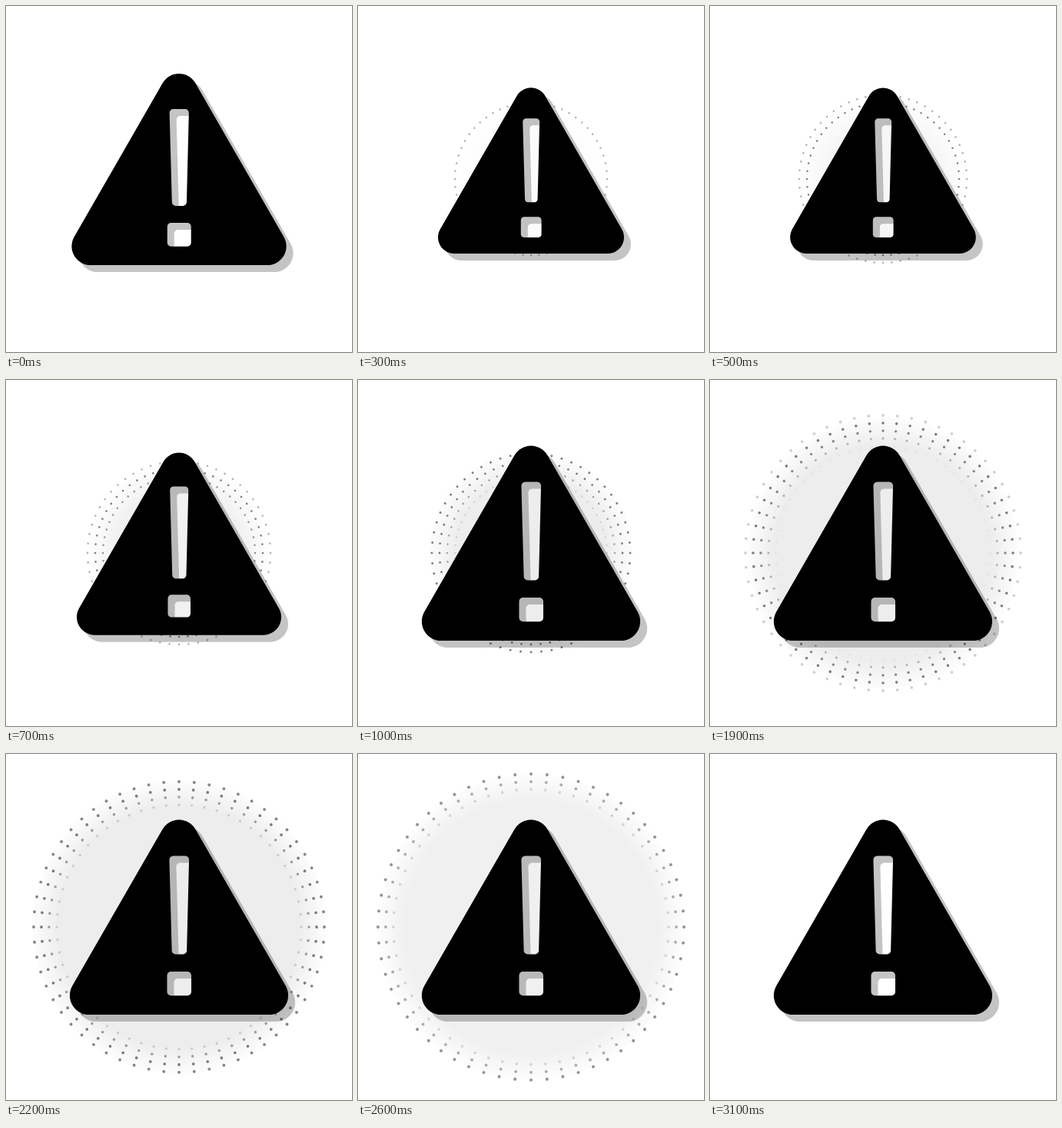
Recreate the animation shown at these times as an HTML page with a canvas. Size 450 px wide and 450 px high, loop 3.6 s.

```html
<!DOCTYPE html>
<html lang="en">
<head>
<meta charset="utf-8">
<title>Warning sign</title>
<style>
  html, body { margin: 0; width: 100%; height: 100%; overflow: hidden; background: #fff; }
  canvas { display: block; width: 100vmin; height: 100vmin; }
</style>
</head>
<body>
<canvas id="stage"></canvas>
<script>
const SIZE = 450, MID = SIZE / 2, LOOP = 3600, STEP = 100, REST = 3100;
const RINGS = 11, DOTS = 60, FIRST_RADIUS = 99, RING_GAP = 10;
const FIRST_START = 170, RING_DELAY = 205;

const canvas = document.getElementById('stage');
const ctx = canvas.getContext('2d');
const ratio = window.devicePixelRatio || 1;
canvas.width = canvas.height = SIZE * ratio;

const ramp = (t, from, to) => Math.min(1, Math.max(0, (t - from) / (to - from)));
const ease = p => p * p * (3 - 2 * p);
const fadeOut = t => 1 - ramp(t, 2500, REST);

function signScale(t) {
  const dip = ease(ramp(t, -100, 400)) - ease(ramp(t, 400, 920));
  return 1 - .166 * dip;
}

function addRoundedPolygon(path, points, radius) {
  const [ax, ay] = points[0], [zx, zy] = points[points.length - 1];
  path.moveTo((ax + zx) / 2, (ay + zy) / 2);
  points.forEach(([x, y], i) => {
    const [nx, ny] = points[(i + 1) % points.length];
    path.arcTo(x, y, nx, ny, radius);
  });
  path.closePath();
}

const sign = new Path2D();
addRoundedPolygon(sign, [[MID, 60.5], [MID + 160.3, 339], [MID - 160.3, 339]], 25);
addRoundedPolygon(sign, [[212.3, 132.5], [238.2, 132.5], [235, 260.5], [215.8, 260.5]], 5);
addRoundedPolygon(sign, [[209.5, 283], [241, 283], [241, 314.3], [209.5, 314.3]], 5);

// Soft disc that grows along with the newest ring.
function drawHalo(t) {
  const grown = (t - FIRST_START) / RING_DELAY * RING_GAP;
  const radius = Math.min(FIRST_RADIUS - 7 + grown, 199);
  const alpha = .072 * ramp(t, 150, 850) * fadeOut(t);
  const fill = ctx.createRadialGradient(MID, MID, radius - 34, MID, MID, radius);
  fill.addColorStop(0, `rgba(0,0,0,${alpha})`);
  fill.addColorStop(1, `rgba(0,0,0,${alpha * .1})`);
  ctx.fillStyle = fill;
  ctx.beginPath();
  ctx.arc(MID, MID, radius, 0, 2 * Math.PI);
  ctx.fill();
}

function drawRing(i, t) {
  const age = t - FIRST_START - RING_DELAY * i;
  const alpha = ease(ramp(age, 0, 220)) * (1 - ramp(age, 450, 950)) * fadeOut(t);
  const radius = FIRST_RADIUS + RING_GAP * i, dot = 1.25 + .08 * i;
  ctx.fillStyle = `rgba(0,0,0,${.5 * alpha})`;
  ctx.beginPath();
  for (let k = 0; k < DOTS; k++) {
    const angle = 2 * Math.PI * k / DOTS;
    const x = MID + radius * Math.sin(angle), y = MID - radius * Math.cos(angle);
    ctx.moveTo(x + dot, y);
    ctx.arc(x, y, dot, 0, 2 * Math.PI);
  }
  ctx.fill();
}

function drawSign(scale, offset, color) {
  ctx.save();
  ctx.translate(MID + offset, MID + offset);
  ctx.scale(scale, scale);
  ctx.translate(-MID, -MID);
  ctx.fillStyle = color;
  ctx.fill(sign, 'evenodd');
  ctx.restore();
}

function draw(t) {
  ctx.setTransform(ratio, 0, 0, ratio, 0, 0);
  ctx.fillStyle = '#fff';
  ctx.fillRect(0, 0, SIZE, SIZE);
  drawHalo(t);
  for (let i = 0; i < RINGS; i++) drawRing(i, t);
  const scale = signScale(t);
  drawSign(scale, 9, 'rgba(0,0,0,.23)');
  drawSign(scale, 0, '#000');
}

const begin = performance.now();
function tick() {
  const t = (performance.now() - begin) % LOOP;
  draw(Math.min(REST, Math.floor(t / STEP) * STEP));
  requestAnimationFrame(tick);
}
tick();
</script>
</body>
</html>
```
